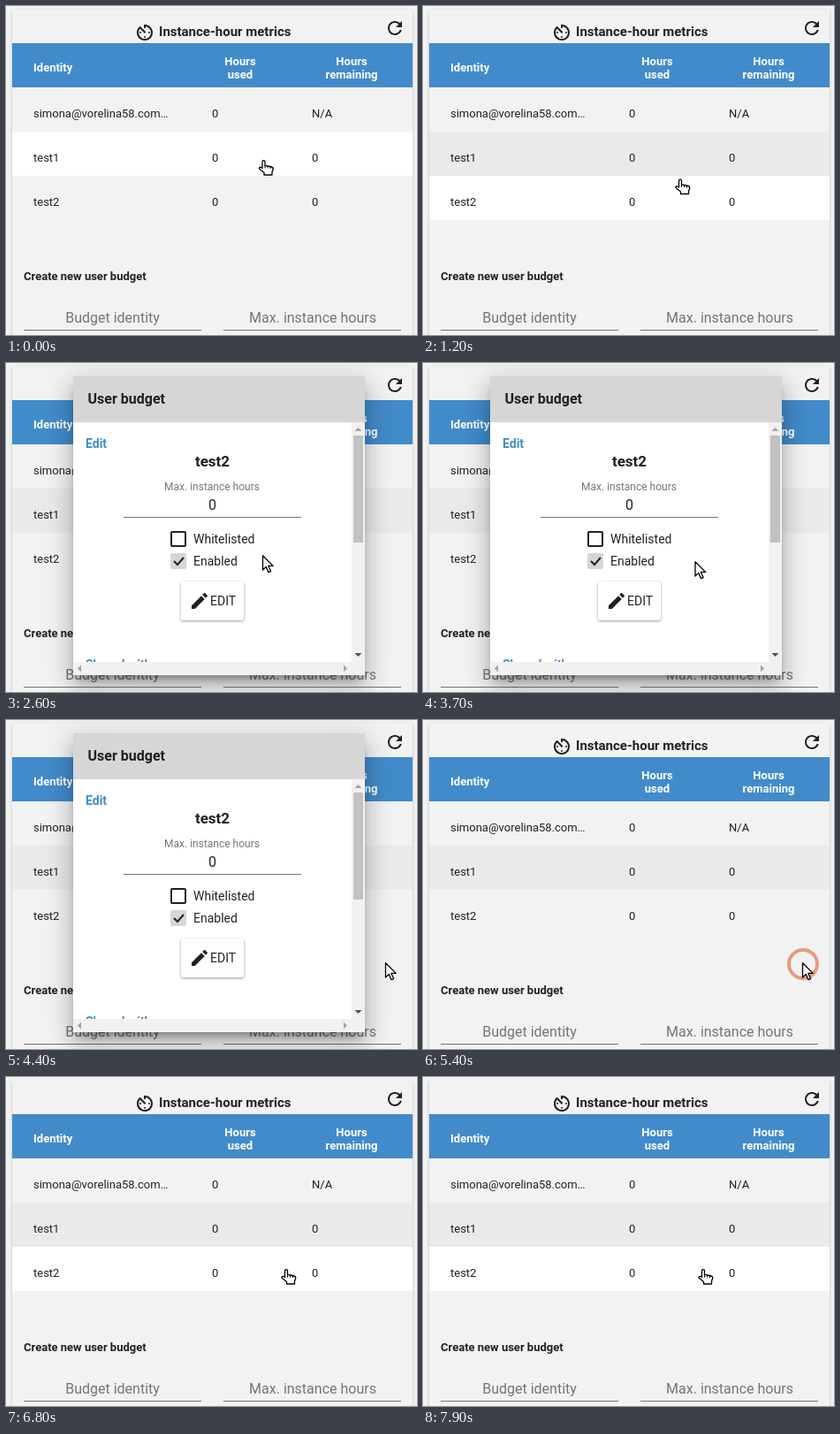
Recreate the animation shown at these times as an HTML page. Size 465x372 px, loop 8000 ms.

```html
<!DOCTYPE html>
<html lang="en">
<head>
<meta charset="utf-8">
<title>Instance-hour metrics</title>
<style>
  html, body { margin: 0; width: 100%; height: 100%; overflow: hidden; background: #f3f3f3; }
  body { position: relative; font: 13px Roboto, sans-serif; }
  svg, .card, .dialog { position: absolute; left: 0; top: 0; }
  .card {
    left: 7px; top: 4px; width: 453px; height: 400px; background: #f2f2f2;
    box-shadow: 0 2px 2px rgba(0,0,0,.14), 0 1px 5px rgba(0,0,0,.12);
  }
  .dialog {
    left: 76px; top: 15px; width: 330px; height: 338px; background: #fff;
    box-shadow: 0 16px 24px 2px rgba(0,0,0,.14), 0 6px 30px 5px rgba(0,0,0,.12),
      0 8px 10px -5px rgba(0,0,0,.4);
  }
  text { fill: #212121; white-space: pre; }
  .b { font-weight: 700; }
  .m { text-anchor: middle; }
  .s12 { font-size: 12px; }
  .s14 { font-size: 14px; }
  .s15 { font-size: 15px; }
  .s16 { font-size: 16px; }
  .s17 { font-size: 17px; }
  .white { fill: #fff; }
  .blue { fill: #428bca; }
  .hint { fill: #757575; }
  .line { fill: #757575; height: 1px; width: 201px; }
  .icon { fill: #212121; }
  .stroke { fill: none; stroke: #212121; stroke-width: 2; }
  .raised { filter: drop-shadow(0 1px 1.5px rgba(0,0,0,.4)); }
  .pointer { fill: #fff; stroke: #000; stroke-width: 1.3; stroke-linejoin: round; }
</style>
</head>
<body>
<div class="card"></div>
<svg width="465" height="372">
  <g transform="translate(145 18)">
    <path class="stroke" d="M12 3V7M12 4A8 8 0 1 1 6 6.7M6 5.5L12.7 12.3"/>
    <g class="icon"><circle cx="7" cy="12" r="1"/><circle cx="17" cy="12" r="1"/><circle cx="12" cy="17" r="1"/></g>
  </g>
  <text class="b s15" x="173" y="34">Instance-hour metrics</text>
  <path class="icon" transform="translate(428 13)" d="M17.65 6.35C16.2 4.9 14.21 4 12 4c-4.42 0-8 3.58-8 8s3.58 8 8 8c3.73 0 6.84-2.55 7.73-6h-2.08c-.82 2.33-3.04 4-5.65 4-3.31 0-6-2.69-6-6s2.69-6 6-6c1.66 0 3.14.69 4.22 1.78L13 11h7V4z"/>

  <rect class="blue" x="7" y="42" width="453" height="50"/>
  <g class="b">
    <text class="white" x="31" y="74">Identity</text>
    <g class="m">
      <text class="white" x="265" y="67">Hours</text>
      <text class="white" x="265" y="82">used</text>
      <text class="white" x="391" y="67">Hours</text>
      <text class="white" x="391" y="82">remaining</text>
    </g>
  </g>
  <g id="rows"></g>

  <text class="b" x="20" y="310">Create new user budget</text>
  <text class="s16 m hint" x="120.5" y="358">Budget identity</text>
  <text class="s16 m hint" x="347" y="358">Max. instance hours</text>
  <rect class="line" x="20" y="366"/>
  <rect class="line" x="246" y="366"/>
</svg>

<div class="dialog" id="dialog">
  <svg width="330" height="338" viewBox="76 15 330 338">
    <rect x="76" y="15" width="330" height="52" fill="#d6d6d6"/>
    <text class="b s16" x="92.5" y="46">User budget</text>
    <text class="b s14 blue" x="90" y="96">Edit</text>
    <text class="b s17 m" x="233.5" y="117">test2</text>
    <text class="s12 m hint" x="233" y="144">Max. instance hours</text>
    <text class="s16 m" x="233.5" y="166">0</text>
    <rect class="line" x="133" y="174"/>

    <rect class="stroke" x="187" y="191" width="16" height="16" rx="1"/>
    <text class="s14" x="212" y="204">Whitelisted</text>
    <rect x="186" y="215" width="18" height="18" rx="2" fill="#d6d6d6"/>
    <path class="stroke" d="M190 224l4 4 7-8"/>
    <text class="s14" x="212" y="229">Enabled</text>

    <rect class="white raised" x="198" y="247" width="71" height="44" rx="2"/>
    <path class="icon" transform="translate(207 257)" d="M3 17.25V21h3.75L17.81 9.94l-3.75-3.75zM20.71 7.04c.39-.39.39-1.02 0-1.41l-2.34-2.34c-.39-.39-1.02-.39-1.41 0l-1.83 1.83 3.75 3.75z"/>
    <text class="s14" x="231" y="274">EDIT</text>
    <text class="b s14 blue" x="90" y="346">Shared with</text>

    <path fill="#f1f1f1" d="M391 67h15v286H76v-15h315z"/>
    <rect x="393" y="82" width="11" height="121" fill="#c1c1c1"/>
    <path fill="#a3a3a3" d="M394.500 77l4-4 4 4zM85 341.500l-4 4 4 4zM382 341.500l4 4-4 4z"/>
    <path fill="#505050" d="M394.500 328l4 4 4-4z"/>
  </svg>
</div>

<svg width="465" height="372">
  <g id="cursor">
    <circle id="ring" cx="1" cy="2" r="16" fill="none" stroke="#e69a80" stroke-width="4"/>
    <path id="arrow" class="pointer" d="M.5.7V17L4.300 13.400 7 19.700 9.600 18.600 6.900 12.400H12.200Z"/>
    <g id="hand" class="pointer" transform="translate(-5.500)">
      <path d="M4 2Q4 .6 5.500 .6T7 2V6.300L13 7.500Q16.300 8 16.300 10.300L15 14V17H6V14.500L1 10.500Q0 9 1.200 8.400 2.500 8 4 9.500Z"/>
      <path d="M7 6V9.500M10 7V9.500M13 7.500V10" stroke-width="1"/>
    </g>
  </g>
</svg>

<script>
  const LOOP = 8000, STEP = 100;
  const $ = id => document.getElementById(id);
  const show = (el, on) => { el.style.display = on ? "" : "none"; };

  const rows = [["simona@vorelina58.com…", "N/A"], ["test1", "0"], ["test2", "0"]];
  const rowColors = ["#f2f2f2", "#eaeaea", "#f2f2f2"];
  $("rows").innerHTML = rows.map(([identity, remaining], i) => {
    const top = 92 + 50 * i, base = top + 34;
    return `<rect x="7" y="${top}" width="453" height="50"/>
      <text x="31" y="${base}">${identity}</text>
      <text x="233" y="${base}">0</text>
      <text x="346" y="${base}">${remaining}</text>`;
  }).join("");
  const rowRects = $("rows").querySelectorAll("rect");

  // Each move: start time, number of steps, destination of the hotspot.
  const start = [291.5, 174];
  const moves = [[900, 8, [290, 217]], [3600, 9, [429, 274]], [6100, 8, [317, 217]]];
  const clicks = [5400, 7600];
  const smooth = p => p * p * (3 - 2 * p);

  function cursorAt(t) {
    let pos = start;
    for (const [begin, steps, to] of moves) {
      if (t < begin) break;
      const p = smooth(Math.min(1, ((t - begin) / STEP + 1) / steps));
      pos = pos.map((v, i) => v + (to[i] - v) * p);
    }
    return pos.map(v => Math.round(v * 2) / 2);
  }

  function ringOpacity(t) {
    const age = Math.min(...clicks.filter(c => t >= c).map(c => t - c));
    return Math.max(0, 1 - age / 300);
  }

  function draw(now) {
    const t = Math.floor(now % LOOP / STEP) * STEP;
    const [x, y] = cursorAt(t);
    const open = t >= 2600 && t < 5400;
    const onRow = !open && y < 242;
    const hand = onRow && !(t >= 2300 && t < 2600);
    const hovered = onRow ? Math.floor((y - 92) / 50) : -1;

    rowRects.forEach((r, i) => r.setAttribute("fill", i === hovered ? "#fff" : rowColors[i]));
    show($("dialog"), open);
    show($("hand"), hand);
    show($("arrow"), !hand);
    $("ring").setAttribute("opacity", ringOpacity(t));
    $("cursor").setAttribute("transform", `translate(${x} ${y})`);
  }

  const origin = performance.now();
  function frame() {
    draw(performance.now() - origin);
    requestAnimationFrame(frame);
  }
  frame();
</script>
</body>
</html>
```
